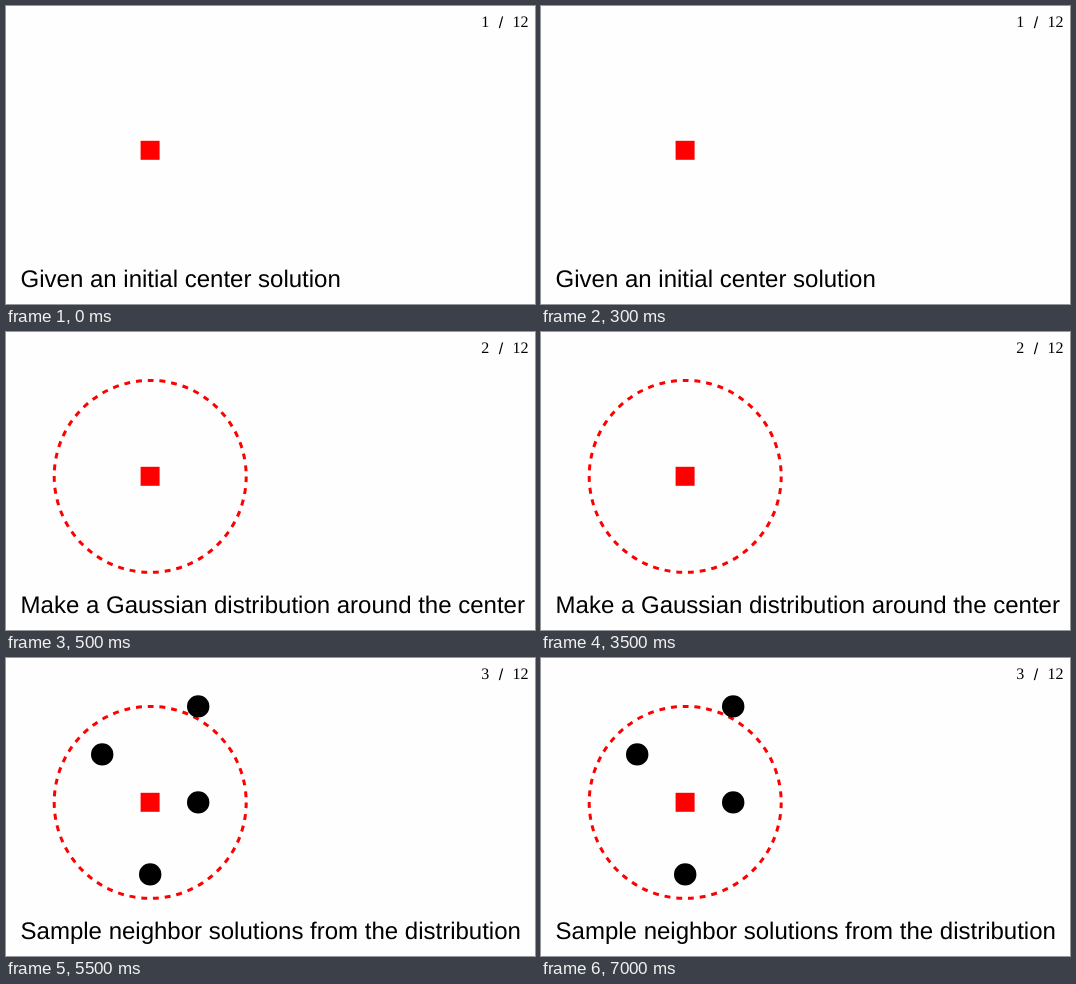
These frames come from a looping animation (529x298 px, 8 s). An HTML page:

```html
<!DOCTYPE html>
<html lang="en">
<head>
<meta charset="utf-8">
<title>Sampling around a center solution</title>
<style>
  html, body { margin: 0; width: 100%; height: 100%; overflow: hidden; background: #fefefe; }
  svg { display: block; width: 529px; height: 298px; }
  text { text-rendering: geometricPrecision; }
  .caption { font: 24px "Liberation Sans", Arial, sans-serif; }
  .page { font: 16px "Liberation Serif", "Times New Roman", serif; }
  .slash { font: 16px "Liberation Sans", Arial, sans-serif; }
</style>
</head>
<body>
<svg viewBox="0 0 529 298">
  <g class="page">
    <text id="page" x="475.2" y="21"></text>
    <text class="slash" x="492.8" y="22">/</text>
    <text x="506.6" y="21">12</text>
  </g>
  <circle id="spread" cx="144.2" cy="144.4" r="96" fill="none" stroke="red" stroke-width="3" stroke-dasharray="5.91"/>
  <rect x="134.6" y="134.8" width="19" height="19" fill="red"/>
  <g id="samples">
    <circle cx="192.2" cy="48.4" r="11.2"/>
    <circle cx="96.2" cy="96.4" r="11.2"/>
    <circle cx="192.2" cy="144.4" r="11.2"/>
    <circle cx="144.2" cy="216.4" r="11.2"/>
  </g>
  <text id="caption" class="caption" x="14.6" y="281"></text>
</svg>
<script>
const LOOP = 8000;
const slides = [
  { start: 0, caption: "Given an initial center solution" },
  { start: 500, caption: "Make a Gaussian distribution around the center" },
  { start: 5500, caption: "Sample neighbor solutions from the distribution" },
];
const byId = id => document.getElementById(id);
const show = (id, visible) => byId(id).setAttribute("visibility", visible ? "visible" : "hidden");
const origin = performance.now();
let current = -1;

function draw() {
  const time = (performance.now() - origin) % LOOP;
  const index = slides.filter(slide => slide.start <= time).length - 1;
  if (index !== current) {
    current = index;
    byId("page").textContent = index + 1;
    byId("caption").textContent = slides[index].caption;
    show("spread", index >= 1);
    show("samples", index >= 2);
  }
  requestAnimationFrame(draw);
}
draw();
</script>
</body>
</html>
```
